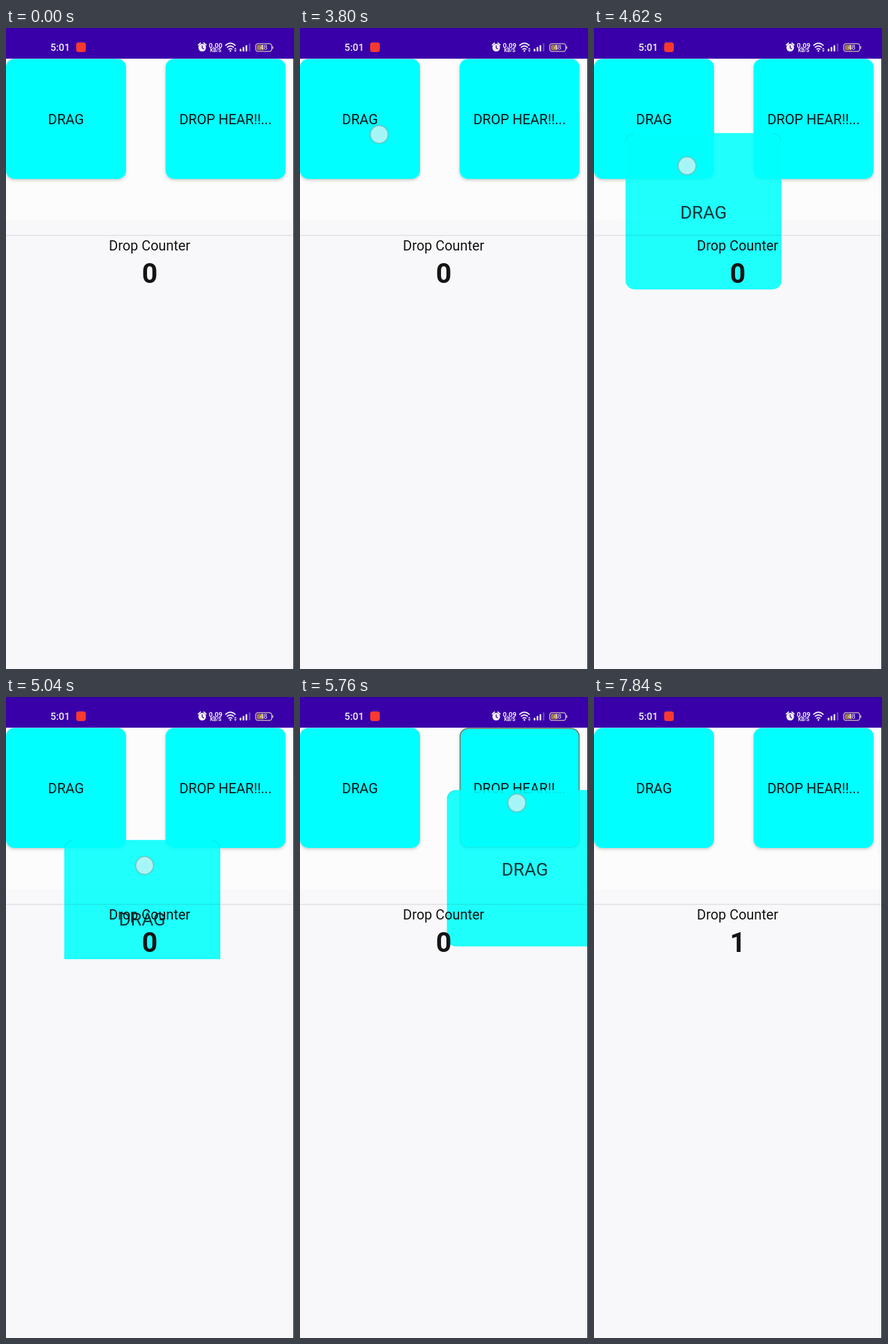
These frames come from a looping animation (480x1066 px, 8 s). An HTML page:

```html
<!DOCTYPE html>
<html lang="en">
<head>
<meta charset="utf-8">
<title>Drag and drop</title>
<style>
  html, body { margin: 0; width: 100%; height: 100%; overflow: hidden; background: #f8f8fa; }
  svg { display: block; width: 100%; height: 100%; font-family: Roboto, sans-serif; }
</style>
</head>
<body>
<svg viewBox="0 0 480 1066" preserveAspectRatio="none">
  <defs>
    <filter id="lift" x="-10%" y="-10%" width="120%" height="120%">
      <feDropShadow dx="0" dy="2" stdDeviation="2.4" flood-color="#55554c" flood-opacity=".32"/>
    </filter>
    <clipPath id="area"><rect y="51" width="480" height="385"/></clipPath>
    <radialGradient id="halo">
      <stop offset=".75" stop-color="#4aa8a0" stop-opacity=".35"/>
      <stop offset="1" stop-color="#4aa8a0" stop-opacity="0"/>
    </radialGradient>
  </defs>

  <rect width="480" height="1066" fill="#f8f8fa"/>
  <rect y="51" width="480" height="269" fill="#fcfcfc"/>
  <rect x="472" y="140" width="7" height="122" fill="#f9f9fa"/>

  <!-- cards -->
  <g fill="#0ff" filter="url(#lift)">
    <rect y="51.5" width="200" height="199.5" rx="14"/>
    <rect x="266" y="51.5" width="200" height="199.5" rx="14"/>
  </g>
  <rect id="edge" x="266.8" y="52.2" width="198.4" height="197.6" rx="13.4" fill="none" stroke="#8f6a4a" stroke-width="1.5"/>
  <g font-size="23" text-anchor="middle" fill="#06191a">
    <text x="100" y="160">DRAG</text>
    <text x="366" y="160">DROP HEAR!!...</text>
  </g>

  <!-- dragged copy, positioned by its centre -->
  <g clip-path="url(#area)">
    <g id="ghost">
      <rect x="-130" y="-130" width="260" height="260" rx="15" fill="#00fffc" fill-opacity=".88"/>
      <path d="M-129-117Q-128-128-117-129M129-117Q128-128 117-129" fill="none" stroke="#0a9a7c" stroke-opacity=".3"/>
      <text y="12" font-size="29.9" text-anchor="middle" fill="#06191a" fill-opacity=".88">DRAG</text>
    </g>
  </g>

  <rect x="479" y="51" width="1" height="1015" fill="#000"/>
  <rect y="344.3" width="479" height="1.2" fill="#33334a" fill-opacity=".16"/>
  <g text-anchor="middle" fill="#151515">
    <text x="239.3" y="370" font-size="23">Drop Counter</text>
    <text id="count" x="239.5" y="424" font-size="45.5" font-weight="700">0</text>
  </g>

  <g id="touch">
    <circle r="18" fill="url(#halo)"/>
    <circle r="14.6" fill="#b2f5f6" fill-opacity=".94" stroke="#7ac8c4" stroke-width="1.5"/>
    <circle r="6" fill="#9af8fc" fill-opacity=".5"/>
  </g>

  <!-- status bar -->
  <rect width="480" height="51" fill="#3900a9"/>
  <g fill="#f1eef2">
    <text x="74" y="38" font-size="16.6" font-weight="500">5:01</text>
    <rect x="117" y="24" width="16" height="16" rx="4" fill="#f8392f"/>
    <circle cx="327" cy="32.6" r="6.4"/>
    <path d="M320.5 28.2l3.6-3.2M333.5 28.2l-3.6-3.2" stroke="#f1eef2" stroke-width="2" stroke-linecap="round"/>
    <path d="M327 29v4l2.8 1.8" fill="none" stroke="#3900a9" stroke-width="1.4"/>
    <g text-anchor="middle" font-weight="700">
      <text id="speed" x="349.3" y="33" font-size="11.3">0.00</text>
      <text x="349.6" y="40" font-size="8.3">KB/S</text>
    </g>
    <g fill="none" stroke="#f1eef2" stroke-width="2">
      <path d="M365.5 29.2Q374 21.2 382.5 29.2"/>
      <path d="M368.2 32.6Q374 27.2 379.8 32.6"/>
      <path d="M370.8 35.8Q374 32.8 377.2 35.8"/>
    </g>
    <circle cx="374" cy="38" r="1.5"/>
    <path id="arrows" d="M380 35.6l2.2-2.6 2.2 2.6zM380 37l2.2 2.6 2.2-2.6z"/>
    <rect x="389.5" y="34.5" width="2.8" height="4.5" rx="1"/>
    <rect x="394.4" y="31.5" width="2.8" height="7.5" rx="1"/>
    <rect x="399.3" y="28.5" width="2.8" height="10.5" rx="1"/>
    <rect x="404.6" y="25.5" width="2.8" height="13.5" rx="1" fill-opacity=".28"/>
    <rect x="416.2" y="26.2" width="26.6" height="12.6" rx="3.6" fill="none" stroke="#e2d9b8" stroke-width="1.3"/>
    <path d="M420 28h9.5v9H420a2 2 0 0 1-2-2v-5a2 2 0 0 1 2-2z" fill="#a07a48"/>
    <rect x="443.8" y="30.3" width="1.5" height="4.4" rx=".7" fill="#e2d9b8"/>
    <text x="429.5" y="36.4" font-size="11" text-anchor="middle">48</text>
  </g>
</svg>
<script>
  const LOOP = 8000, PRESS = 3800, LIFT = 4300, HOVER = 5450, DROP = 6480;
  const $ = id => document.getElementById(id);
  const [edge, ghost, count, touch, speed, arrows] =
    ['edge', 'ghost', 'count', 'touch', 'speed', 'arrows'].map($);

  // [time, x, y]
  const finger = [
    [3800, 132, 177], [4280, 132, 177], [4420, 138, 192], [4620, 155, 229],
    [4860, 190, 271], [5100, 246, 281], [5340, 312, 249], [5600, 351, 203],
    [5900, 366, 159], [6180, 368, 144.5], [6480, 368, 144.5]
  ];
  const copy = [
    [4300, 164, 262], [4440, 169, 276], [4620, 182.5, 304.5], [4860, 205, 346],
    [5100, 235, 370], [5340, 270, 365], [5600, 341, 323], [5900, 393, 257],
    [6180, 403, 233.4], [6480, 403, 233.4]
  ];

  // tangent at a key; flat where the direction turns
  function slope(keys, i, k) {
    const a = keys[i - 1], b = keys[i], c = keys[i + 1];
    if (!a || !c) return 0;
    const d0 = (b[k] - a[k]) / (b[0] - a[0]), d1 = (c[k] - b[k]) / (c[0] - b[0]);
    return d0 * d1 <= 0 ? 0 : 2 * d0 * d1 / (d0 + d1);
  }

  function at(keys, t, k) {
    const last = keys.length - 1;
    if (t <= keys[0][0]) return keys[0][k];
    if (t >= keys[last][0]) return keys[last][k];
    let i = 0;
    while (keys[i + 1][0] <= t) i++;
    const a = keys[i], b = keys[i + 1], h = b[0] - a[0], u = (t - a[0]) / h;
    const s = u * u * (3 - 2 * u);
    return a[k] + (b[k] - a[k]) * s
      + h * u * (1 - u) * ((1 - u) * slope(keys, i, k) - u * slope(keys, i + 1, k));
  }

  const show = (el, on) => el.setAttribute('visibility', on ? 'visible' : 'hidden');
  const place = (el, keys, t) =>
    el.setAttribute('transform', `translate(${at(keys, t, 1)} ${at(keys, t, 2)})`);

  function draw(t) {
    show(touch, t >= PRESS && t < DROP);
    show(ghost, t >= LIFT && t < DROP);
    show(edge, t >= HOVER && t < DROP);
    show(arrows, t < 6880);
    place(touch, finger, t);
    place(ghost, copy, t);
    count.textContent = t < DROP ? '0' : '1';
    speed.textContent = t < 860 ? '0.00' : '0.09';
  }

  const start = performance.now();
  function tick() {
    draw((performance.now() - start) % LOOP);
    requestAnimationFrame(tick);
  }
  tick();
</script>
</body>
</html>
```
